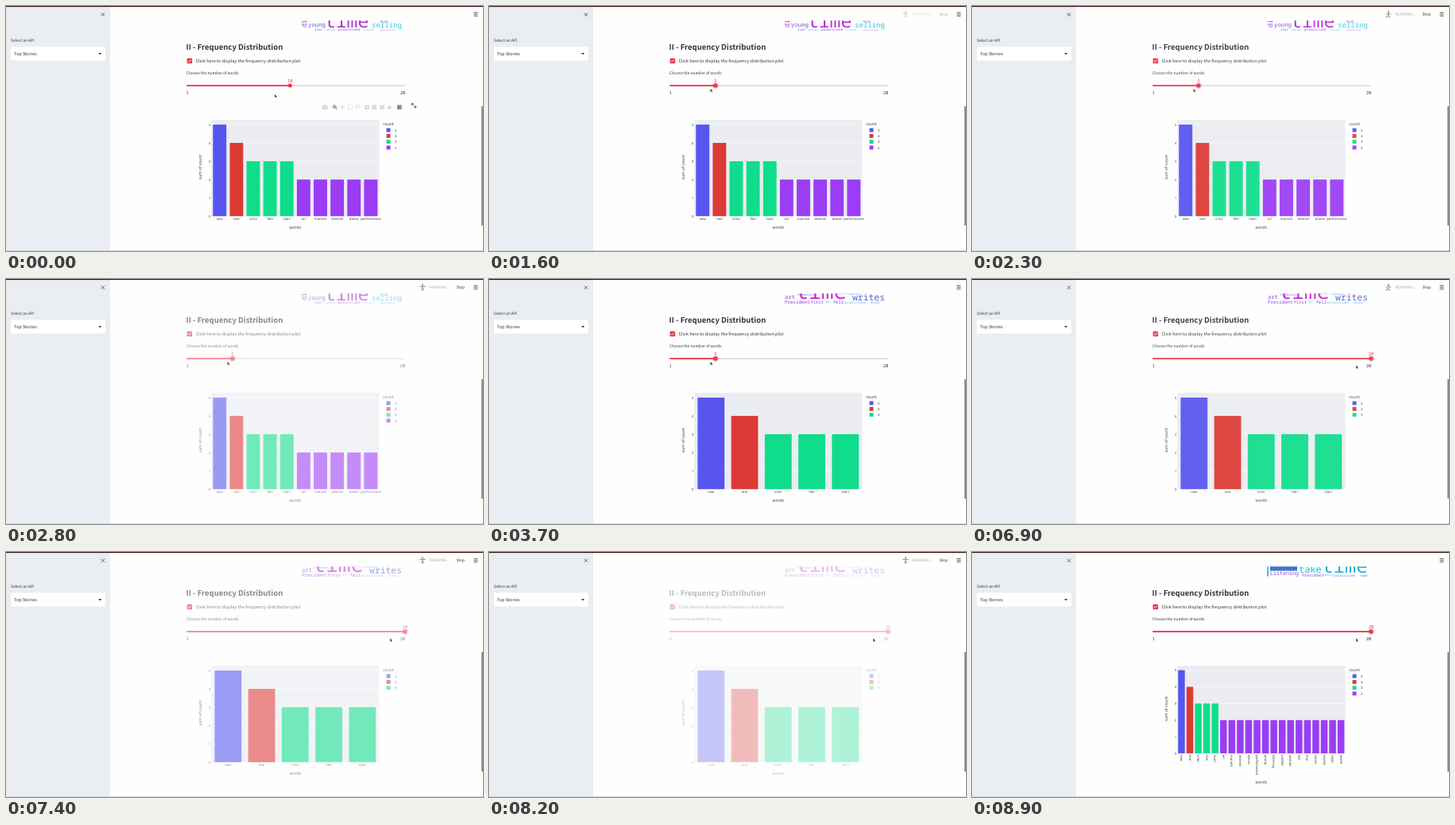
An HTML page for the animation above (9000 ms loop, 600 px wide and 308 px high).

```html
<!DOCTYPE html>
<html lang="en">
<head>
<meta charset="utf-8">
<title>Frequency distribution</title>
<style>
  html, body { margin: 0; width: 100%; height: 100%; overflow: hidden; background: #fefefe; }
  svg { display: block; width: 600px; height: 308px; }
  text { text-rendering: geometricPrecision; fill: #31333f; font-size: 4.92px;
    font-family: "Noto Sans CJK JP", "Noto Sans CJK SC", "Noto Sans CJK", Lato, sans-serif; }
  .body { font-size: 5.55px; }
  .mono text, text.mono { font-family: "Noto Sans Mono", "DejaVu Sans Mono", monospace; }
  .num { font-size: 5.5px; }
  #chart text { font-family: "Open Sans", "Noto Sans", sans-serif; font-size: 4.2px; fill: #2a3042; }
  #chart .title { font-size: 5.1px; }
  .line { fill: none; stroke-linecap: round; stroke-linejoin: round; }
</style>
</head>
<body>
<svg viewBox="0 0 600 308" xmlns="http://www.w3.org/2000/svg">
  <defs><clipPath id="crop"><rect x="371" y="18.3" width="128" height="14"/></clipPath></defs>
  <rect width="600" height="308" fill="#fefefe"/>
  <rect width="131" height="308" fill="#eaedf1"/>
  <path class="line" d="M120 8.8l3.8 3.8m0-3.8l-3.8 3.8" stroke="#444651" stroke-width=".8"/>
  <text x="6" y="45.4">Select an API</text>
  <rect x="6" y="51.3" width="119" height="17.2" rx="1.6" fill="#fff"/>
  <text class="body" x="10" y="62.2">Top Stories</text>
  <path d="M116 58.9h4.2l-2.1 2.3z" fill="#31333f"/>

  <g id="main">
    <g id="cloud" class="mono" clip-path="url(#crop)"></g>
    <text x="226.6" y="54.9" font-weight="700" style="font-size:9.5px">II - Frequency Distribution</text>
    <rect x="227.6" y="65.8" width="6.6" height="6.5" rx="1.1" fill="#e8334a"/>
    <path class="line" d="M229.2 69.1l1.2 1.3 2.2-2.7" stroke="#fff" stroke-width=".9"/>
    <text class="body" x="238.4" y="71.2">Click here to display the frequency distribution plot</text>
    <text x="226.8" y="86.4">Choose the number of words</text>
    <rect x="227" y="99.3" width="275" height="1.6" rx=".8" fill="#dcdde3"/>
    <rect id="fill" x="227" y="99.3" height="1.6" rx=".8" fill="#ec334b"/>
    <circle id="halo" cy="100.1" r="3.7" fill="#ec334b" opacity=".4"/>
    <circle id="thumb" cy="100.1" r="2.5" fill="#ec334b"/>
    <text id="value" class="mono num" y="96" text-anchor="middle" style="fill:#e8334a"></text>
    <text class="mono num" x="226.5" y="111.2">1</text>
    <text class="mono num" x="502.3" y="111.2" text-anchor="end">20</text>
    <g id="chart"></g>
  </g>

  <g id="modebar">
    <g class="line" stroke="#cfd2d8" stroke-width="1">
      <path d="M398.8 125.5h1.2l.6-.9h1.6l.6.9h1.2v4h-5.2z" fill="#cfd2d8"/>
      <circle cx="401.4" cy="127.3" r=".9" stroke="#fefefe" stroke-width=".6"/>
      <g stroke="#7d828c"><circle cx="413.3" cy="126.6" r="1.9"/><path d="M414.8 128.1l1.7 1.7M412.6 126.6h1.4" /></g>
      <path d="M423.3 124.6v5.2m-2.6-2.6h5.2" stroke-width=".8"/>
      <path d="M430.6 124.6h5v5h-5z" stroke-dasharray="1 1.2" stroke-width=".7"/>
      <path d="M440.6 129.6c0-1.4-1.4-1.6-1-3 .6-2.6 5.6-2.4 5.4 0-.2 2-3 2-4.2 1.4" stroke-width=".8"/>
      <path d="M452 125h4.6v4.6H452zM461 125h4.6v4.6H461zM471 125h4.6v4.6H471z" fill="#cfd2d8" stroke-width=".6"/>
      <path d="M454.3 126v2.6m-1.3-1.3h2.6M462 127.3h2.6M472.2 126.2l2.2 2.2m0-2.2l-2.2 2.2" stroke="#fefefe" stroke-width=".6"/>
      <path d="M480 127.3l2.4-2.4 2.4 2.4h-.8v2.2h-3.2v-2.2z" fill="#cfd2d8" stroke-width=".5"/>
    </g>
    <rect x="492" y="124.5" width="5.6" height="5.4" fill="#83878f"/>
    <path class="line" d="M510.5 124.6v-1.9h1.9m-1.9 0l5.2 5m0-1.9v1.9h-1.9" stroke="#3a3c48" stroke-width=".8"/>
  </g>

  <g id="status">
    <circle cx="524" cy="7.3" r="1" fill="#777a83"/>
    <path id="runner" class="line" stroke="#777a83" stroke-width=".9"/>
    <text x="532.4" y="12.4" style="fill:#a9abb2">RUNNING...</text>
    <text x="566.4" y="12.4">Stop</text>
  </g>
  <path d="M588.4 8.3h5m-5 2.1h5m-5 2.1h5" stroke="#4a4c57" stroke-width=".9"/>
  <rect x="598" y="126" width="2" height="150" fill="#8d8d8f"/>
  <rect width="600" height="1.1" fill="#34100f"/>
  <rect y="307.2" width="600" height=".8" fill="#d3d5d9"/>
  <path id="cursor" d="M0 0v4.1l1-.9.7 1.5.7-.3-.7-1.5h1.3z" fill="#111" stroke="#fff" stroke-width=".3"/>
</svg>

<script>
const LOOP = 9000;
const RUNS = [
  { start: 1400, stale: 2050, end: 3400 },
  { start: 6150, stale: 6640, end: 8400 },
];
const WORDS = ("new one critic film stars art marvick drensel dance performance " +
  "young listening middle women fell first tarvel moske takes world").split(" ");
const COUNTS = [5, 4, 3, 3, 3];
const COLORS = { 5: "#5754f0", 4: "#dc3a35", 3: "#0fdd8b", 2: "#9a3df5" };
const SLIDER = { left: 227, step: 275 / 19 };

// Cursor path: time, x, y
const PATH = [
  [0, 338, 111], [300, 357, 99.5], [400, 357, 99.5], [1000, 278.5, 104],
  [4300, 278.5, 104], [4800, 284.5, 99], [5150, 284.5, 99], [5800, 518, 103],
  [6050, 518, 103], [6500, 483.2, 108.6], [9000, 483.2, 108.6],
];

// Each word: text, x, baseline, size, colour, optional rotation
const CLOUDS = [
  [["di", 378, 27, 8.5, "#a23be0", -90], ["young", 380, 26, 7.3, "#6a52c8"],
   ["time", 401, 26.8, 23, "#b32fd0"], ["age", 470, 19.6, 6, "#9a7be0"],
   ["selling", 460, 26.8, 9, "#35c9de"], ["like", 388, 31, 4, "#5c6fe0"],
   ["century", 401, 31, 3.2, "#46b5cf"], ["prioritized", 418, 31, 4.1, "#8b3fd6"],
   ["islander", 449, 31, 2.9, "#5cc4dd"], ["practicing", 471, 31, 3, "#a582dc"]],
  [["art", 372, 25.3, 7.2, "#7a4fd0"], ["thumbnails", 387, 21, 4, "#8d76d8"],
   ["time", 386, 25, 26.5, "#c02ad8"], ["remember", 450, 20, 4, "#58bfdd"],
   ["writes", 457, 26.6, 11.4, "#5a63d6"], ["President", 372, 31, 5.9, "#8a3fd6"],
   ["first", 404.5, 31, 5.5, "#a03be0"], ["is", 423, 30, 5, "#48c5dd"],
   ["fell", 432.5, 31, 5.6, "#8a3fd6"], ["prioritized", 447, 31, 4.1, "#5bb7dc"],
   ["minds", 480, 31, 4, "#48c5dd"]],
  [["take", 411, 25.6, 12, "#24bfd0"], ["time", 440, 26.4, 24, "#2aaed0"],
   ["Listening", 375, 28.8, 6.7, "#7c45d2"], ["President", 415, 31, 5.2, "#a33bdc"],
   ["world", 443.5, 30, 3.4, "#58a8dc"], ["prioritized", 455, 31, 4, "#7a6fdc"],
   ["some", 488, 31, 4, "#3a7fd0"]],
];
const RUNNER = [
  "M520.8 9.4h6.4M524 9.2v2.6m0 0l-1.3 2.4m1.3-2.4l1.3 2.4",
  "M521.3 10.5l1.2-1.4 1.8.2 1.2 1.2 1.4-.5M524 9.3l-.6 2.6 1.7 1 .2 1.6m-1.9-2.6l-.8 1.6-1.8.1",
];

const $ = id => document.getElementById(id);
const set = (id, attrs) => {
  for (const key in attrs) $(id).setAttribute(key, attrs[key]);
};
const clamp = v => Math.min(1, Math.max(0, v));
const rect = (x, y, w, h, fill) =>
  `<rect x="${x}" y="${y}" width="${w}" height="${h}" fill="${fill}"/>`;
const label = (str, x, y, extra = "") => `<text x="${x}" y="${y}" ${extra}>${str}</text>`;

function drawChart(n) {
  const left = 258.2, width = 211.2, top = 143;
  const bottom = n > 10 ? 253.2 : 264.2;
  const unit = (bottom - top) * 0.95 / 5;
  const step = width / n;
  const middle = (top + bottom) / 2;
  let out = rect(left, top, width, bottom - top, "#eaecf1");
  for (let i = 0; i <= 5; i++) {
    const y = bottom - i * unit;
    if (i) out += rect(left, y - 0.25, width, 0.5, "#fff");
    out += label(i, 257.4, y + 1.5, 'text-anchor="end"');
  }
  WORDS.slice(0, n).forEach((word, i) => {
    const count = COUNTS[i] || 2;
    const x = left + (i + 0.5) * step;
    out += rect(x - step * 0.4, bottom - count * unit, step * 0.8, count * unit, COLORS[count]);
    out += n > 10
      ? label(word, 0, 0, `transform="translate(${x - 1.4} ${bottom + 1.8}) rotate(90)"`)
      : label(word, x, bottom + 4.9, 'text-anchor="middle"');
  });
  out += label("words", 363.8, n > 10 ? 290.8 : 280.2, 'class="title" text-anchor="middle"');
  out += label("sum of count", 0, 0,
    `class="title" text-anchor="middle" transform="translate(245.6 ${middle - 1}) rotate(-90)"`);
  out += label("count", 474.2, 150.2, 'class="title"');
  [5, 4, 3, 2].slice(0, n > 5 ? 4 : 3).forEach((count, i) => {
    const y = 156 + i * 7.3;
    out += rect(478.6, y - 2.4, 4.9, 4.9, COLORS[count]) + label(count, 489, y + 1.6);
  });
  return out;
}

function drawCloud(index) {
  const block = index === 2
    ? rect(375, 18, 34, 5.6, "#4474c8") + rect(371, 18, 2, 12.6, "#45c4d8") : "";
  return block + CLOUDS[index].map(([str, x, y, size, color, turn = 0]) =>
    label(str, 0, 0, `style="font-size:${size}px;fill:${color}" ` +
      `transform="translate(${x} ${y}) rotate(${turn})"`)).join("");
}

function cursorAt(t) {
  const i = PATH.findIndex(p => p[0] > t);
  const [t0, x0, y0] = PATH[i - 1], [t1, x1, y1] = PATH[i];
  const p = (t - t0) / (t1 - t0), e = p * p * (3 - 2 * p);
  return [x0 + (x1 - x0) * e, y0 + (y1 - y0) * e];
}

function sliderValue(t, x) {
  const dragged = Math.min(20, Math.round((x - SLIDER.left) / SLIDER.step) + 1);
  if (t < 400) return 10;
  if (t < 1000) return Math.min(10, dragged);
  if (t < 5150) return 5;
  return t < 5800 ? dragged : 20;
}

let shown = -1;
function render(t) {
  const stage = RUNS.filter(run => t >= run.end).length;
  if (stage !== shown) {
    shown = stage;
    $("chart").innerHTML = drawChart([10, 5, 20][stage]);
    $("cloud").innerHTML = drawCloud(stage);
  }

  const run = RUNS.find(r => t >= r.start && t < r.end);
  const fade = run ? clamp((t - run.stale) / 1000) ** 1.7 : 0;
  set("main", { opacity: 1 - 0.67 * fade });
  set("status", { opacity: run ? clamp((t - run.start) / 480) : 0 });
  set("runner", { d: RUNNER[Math.floor(t / 100) % 2] });

  const [x, y] = cursorAt(t);
  const value = sliderValue(t, x);
  const thumbX = SLIDER.left + (value - 1) * SLIDER.step;
  set("cursor", { transform: `translate(${x} ${y})` });
  set("fill", { width: thumbX - SLIDER.left });
  set("thumb", { cx: thumbX });
  set("halo", { cx: thumbX, visibility: t < 350 ? "hidden" : "visible" });
  set("value", { x: thumbX });
  $("value").textContent = value;
  set("modebar", { opacity: 1 - clamp((t - 100) / 200) });
}

const begin = performance.now();
function tick() {
  render((performance.now() - begin) % LOOP);
  requestAnimationFrame(tick);
}
tick();
</script>
</body>
</html>
```
